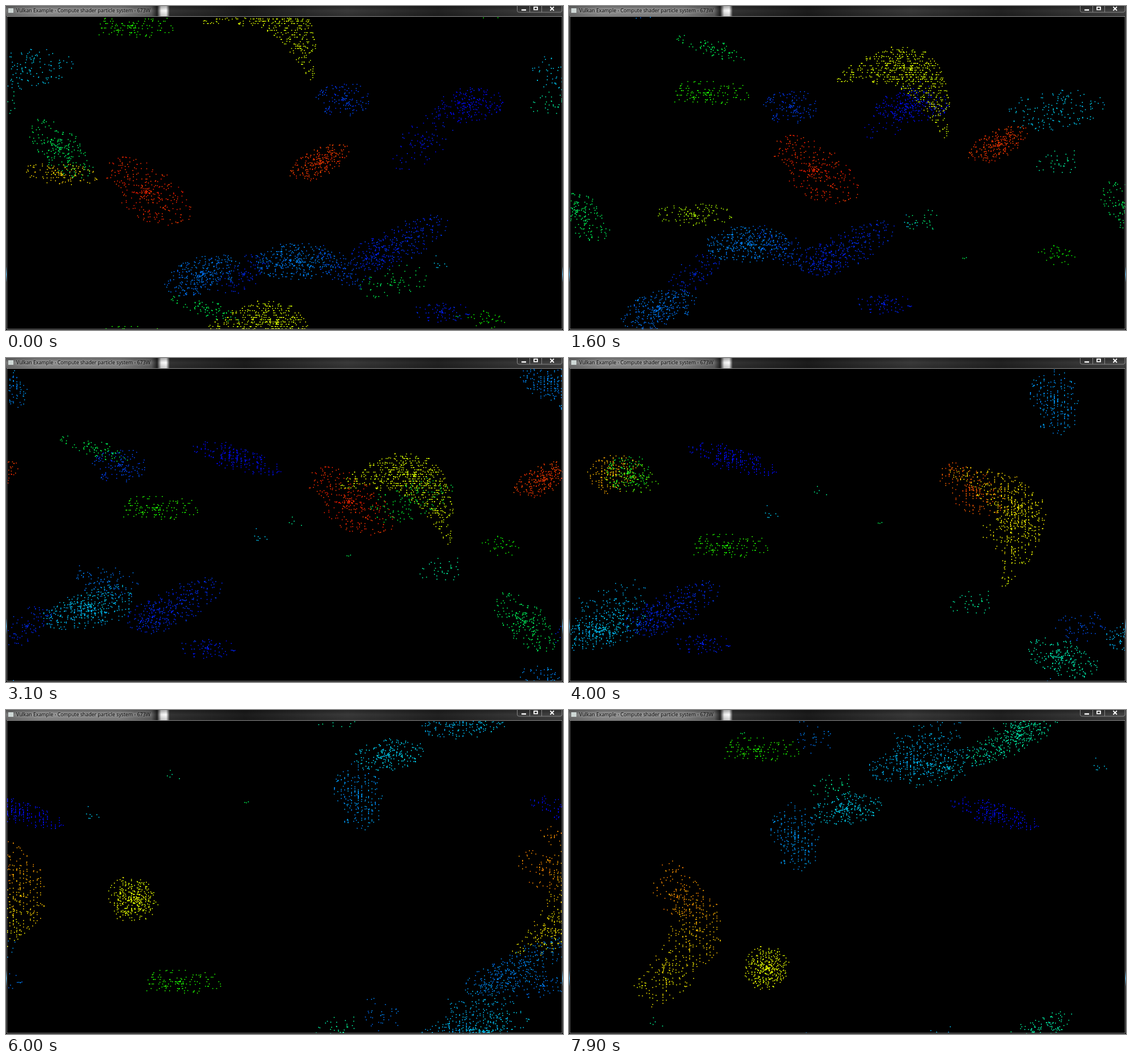
An HTML page with a canvas for the animation above (8 s loop, 980 by 571 pixels).

```html
<!DOCTYPE html>
<html lang="en">
<head>
<meta charset="utf-8">
<title>Particles</title>
<style>
html, body { margin: 0; width: 100%; height: 100%; overflow: hidden; background: #000; }
#win { position: relative; width: 980px; height: 571px; overflow: hidden; background: #000; }
#bar { position: absolute; inset: 0 0 auto; height: 18px;
  background: linear-gradient(#0005, #0000 8px, #0003),
    linear-gradient(90deg, #777, #999 60px, #909090 200px, #666 256px, #222 266px,
      #eee 273px, #fff 282px, #333 288px, #1c1c1c 420px, #3a3a3a 600px, #222 760px, #444); }
#title { position: absolute; left: 18px; top: 2px; white-space: nowrap; color: #000;
  font: 8.8px/13px "Open Sans", "Noto Sans", sans-serif; text-shadow: 0 0 4px #bbb; }
#icon { position: absolute; left: 4px; top: 4px; width: 9px; height: 8px; background: #cfd8d6; }
canvas { position: absolute; left: 0; top: 0; }
#frame { position: absolute; left: 1px; top: 18px; width: 976px; height: 550px; border: 1px solid #8a8a8a; }
#edge { position: absolute; left: 0; top: 460px; width: 978px; height: 26px; border: solid #29a3e8; border-width: 0 1px;
  border-image: linear-gradient(#0000, #29a3e8, #0000) 1; }
#buttons { position: absolute; right: 1px; top: -1px; }
</style>
</head>
<body>
<div id="win">
  <canvas width="980" height="571"></canvas>
  <div id="bar"></div>
  <div id="icon"></div>
  <div id="title">Vulkan Example - Compute shader particle system - 673W</div>
  <svg id="buttons" width="80" height="14" fill="none" stroke="#888">
    <path d="M.5 0V9q0 3 3 3H76q3 0 3-3V0M22.5 0V12M43.5 0V12"/>
    <path d="M8 8H16" stroke="#fff" stroke-width="2.4"/>
    <rect x="30" y="3" width="6" height="4.5" stroke="#fff" stroke-width="1.8"/>
    <path d="M58.500 2.500L65 9M65 2.500L58.500 9" stroke="#fff" stroke-width="1.8"/>
  </svg>
  <div id="frame"></div>
  <div id="edge"></div>
</div>
<script>
const ctx = document.querySelector('canvas').getContext('2d');
const LEFT = 2, TOP = 19, W = 976, H = 550;
const LOOP = 8000, STEP = 100, MORPH = 1.8;

const mod = (a, n) => ((a % n) + n) % n;
const mix = (a, b, f) => a + (b - a) * f;
const snap = (a, grid) => Math.round(a / grid) * grid;
const smooth = x => { x = Math.min(1, Math.max(0, x)); return x * x * (3 - 2 * x); };

let seed = 8191;
const rnd = () => (seed = (seed * 16807) % 2147483647) / 2147483647;

// A round cloud, denser towards its middle
function makeDot() {
  const r = 1.28 * rnd() ** .75, a = rnd() * 2 * Math.PI;
  return { u: r * Math.cos(a), v: r * Math.sin(a), tint: (rnd() - .5) * 12, loose: rnd() < .3 };
}

// A swarm is at `at` when `turn` comes, flies with v before it and w after it,
// and eases from one shape [length, width, tilt, bend] and hue to the next.
// `rows` lines the dots up before the turn, `cols` after it; `keep` is the share that stays.
const swarms = [];
function swarm({ n, turn = 0, at, v, w = v, shape, next = shape, hue, nextHue = hue, ...rest }) {
  const dots = Array.from({ length: n }, makeDot);
  swarms.push({ keep: 1, until: 9, rows: 0, cols: 0, ...rest, turn, at, v, w, shape, next, hue, nextHue, dots });
}

// Yellow crescent and the two swarms that join its ends
swarm({ n: 640, turn: 4, at: [790, 266], v: [78, 64], w: [105, 32], shape: [85, 32, 28, 45],
  next: [92, 38, 102, 50], hue: 68, nextHue: 47, grad: 12, rows: 4, cols: 6, keep: .55 });
swarm({ n: 290, turn: 4, at: [710, 232], v: [115, -24], w: [117, 25], shape: [68, 36, 36],
  next: [38, 24, 30], hue: 10, nextHue: 33, cols: 6, keep: .25 });
swarm({ n: 150, turn: 3.2, at: [700, 255], v: [-95, 45], w: [95, 48], shape: [72, 28, -5],
  next: [52, 24, -32], hue: 190, nextHue: 58, cols: 6, keep: .55 });

// Orange streak and the swarms that fuse with it into a yellow ball
swarm({ n: 230, turn: 3.9, at: [1046, 198], v: [127, -20], w: [69, 64], shape: [46, 20, -25],
  next: [32, 32, 0], hue: 14, nextHue: 64, cols: 5, keep: .7 });
swarm({ n: 130, turn: 3.9, at: [97, 195], v: [-127, 8], w: [63, 65], shape: [38, 24, 0],
  next: [26, 26, 0], hue: 225, nextHue: 66, keep: .8 });
swarm({ n: 75, turn: 3.9, at: [105, 203], v: [-63, 57], w: [60, 63], shape: [52, 12, 18],
  next: [30, 28, 0], hue: 140, nextHue: 67 });

// Greens
swarm({ n: 125, turn: 9, at: [346, 700], v: [14, 74], shape: [64, 17, 0], hue: 112, rows: 4 });
swarm({ n: 210, turn: 4, at: [-108, 528], v: [-51, 69], w: [-97, 50], shape: [58, 27, 42],
  next: [52, 22, -8], hue: 142, nextHue: 188 });
swarm({ n: 120, turn: 2, at: [250, 385], v: [77, 45], w: [-95, 45], shape: [52, 15, 5],
  next: [62, 20, -20], hue: 52, nextHue: 188 });
swarm({ n: 38, at: [965, 170], v: [-63, 65], shape: [34, 18, -10], hue: 158 });
swarm({ n: 36, at: [843, 555], v: [8, -72], shape: [28, 15, 0], hue: 117, until: 3.3 });
swarm({ n: 65, turn: 1.4, at: [640, 390], v: [-30, -68], w: [-74, -60], shape: [50, 22, -10],
  next: [14, 12, 0], hue: 140, nextHue: 158, keep: .08 });
swarm({ n: 3, at: [802, 545], v: [-62, -64], shape: [10, 2, 0], hue: 142 });
swarm({ n: 8, at: [763, 455], v: [-102, -45], shape: [18, 12, 15], hue: 190 });

// Blue chain along the bottom
swarm({ n: 330, turn: 2.2, at: [240, 408], v: [-123, -19], w: [-107, 41], shape: [58, 26, 0],
  next: [64, 25, -10], hue: 209, nextHue: 196, cols: 6, keep: .8 });
swarm({ n: 300, turn: 3, at: [-6, 587], v: [-117, 38], shape: [54, 26, -18],
  next: [48, 34, 78], hue: 211, nextHue: 203, cols: 6, keep: .75 });
swarm({ n: 90, turn: 4, at: [-75, 472], v: [-123, 0], w: [-121, 32], shape: [42, 22, -35],
  next: [30, 24, 20], hue: 230, nextHue: 210, keep: .4 });
swarm({ n: 110, turn: 3.2, at: [165, 390], v: [-134, -22], w: [-108, 43], shape: [48, 22, 30],
  next: [56, 24, -15], hue: 222, nextHue: 196, keep: .8 });
swarm({ n: 195, turn: 6.2, at: [-90, 450], v: [-128, 6], w: [-56, 80], shape: [64, 26, -28],
  next: [84, 22, -30], hue: 229, nextHue: 160 });
swarm({ n: 130, turn: 6.2, at: [-137, 475], v: [-127, 6], w: [-30, 73], shape: [36, 24, -15],
  next: [74, 20, -30], hue: 230, nextHue: 162 });
swarm({ n: 75, turn: 6.2, at: [-58, 482], v: [-133, -9], w: [-75, 65], shape: [42, 15, 0],
  next: [70, 18, -30], hue: 233, nextHue: 165 });

// Deep blue drift to the left
swarm({ n: 200, turn: 2, at: [551, 176], v: [-132, 1], shape: [48, 25, -8],
  next: [64, 17, 15], hue: 238, cols: 7, keep: .85 });
swarm({ n: 90, turn: 2.2, at: [517, 166], v: [-99, -32], w: [-130, 3], shape: [58, 28, -45],
  next: [60, 13, 16], hue: 235, nextHue: 238, cols: 7, keep: .4 });

function drawSwarm(s, t) {
  if (t > s.until) return;
  const age = t - s.turn, f = smooth(age / MORPH + .5);
  const [vx, vy] = age < 0 ? s.v : s.w;
  const [len, wide, tilt, bend = 0] = s.shape.map((a, i) => mix(a, s.next[i], f));
  const hue = mix(s.hue, s.nextHue, f), grad = (s.grad ?? 0) * f;
  const c = Math.cos(tilt * Math.PI / 180), sn = Math.sin(tilt * Math.PI / 180);
  const count = s.dots.length * mix(1, s.keep, f);
  for (const d of s.dots.slice(0, count)) {
    const along = d.u * len, across = d.v * wide + bend * d.u * d.u;
    let x = along * c - across * sn, y = along * sn + across * c;
    if (!d.loose && s.rows && age < 0) y = snap(y, s.rows);
    if (!d.loose && s.cols && age >= 0) x = snap(x, s.cols);
    x = LEFT + mod(s.at[0] + vx * age + x - LEFT, W);
    y = TOP + mod(s.at[1] + vy * age + y - TOP, H);
    ctx.fillStyle = `hsl(${Math.min(240, hue + d.tint + d.u * grad)} 100% 50%)`;
    ctx.fillRect(x, y, 1.6, 1.6);
  }
}

function draw() {
  const t = Math.floor(performance.now() % LOOP / STEP) * STEP / 1000;
  ctx.fillStyle = '#000';
  ctx.fillRect(0, 0, 980, 571);
  for (const s of swarms) drawSwarm(s, t);
  requestAnimationFrame(draw);
}
draw();
</script>
</body>
</html>
```
